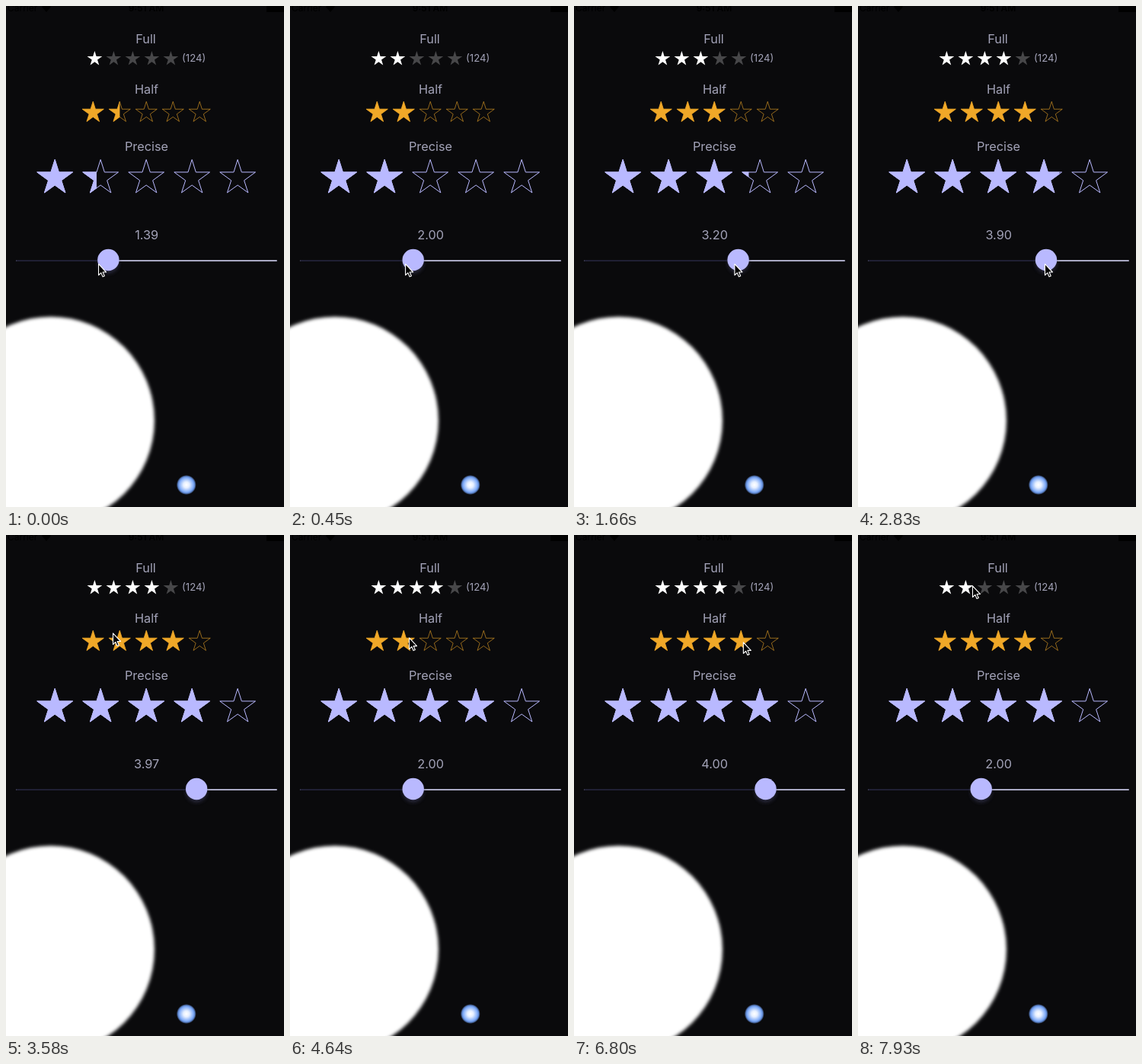
An HTML page for the animation above (7990 ms loop, 365 px wide and 657 px high).

```html
<!DOCTYPE html>
<html lang="en">
<head>
<meta charset="utf-8">
<title>Star ratings</title>
<style>
  html, body { margin: 0; width: 100%; height: 100%; overflow: hidden; background: #0a0a0c; }
  svg { display: block; width: 365px; height: 657px; }
  text { font-family: Inter, "Liberation Sans", sans-serif; font-size: 16.3px; fill: #a3a3b8; }
  .status { font-size: 12px; fill: #000; }
  .count { font-size: 13.2px; }
  .mid { text-anchor: middle; }
</style>
</head>
<body>
<svg viewBox="0 0 365 657">
  <defs>
    <filter id="soft" x="-10%" y="-10%" width="120%" height="120%"><feGaussianBlur stdDeviation="2"/></filter>
    <filter id="glow" x="-50%" y="-50%" width="200%" height="200%"><feGaussianBlur stdDeviation="2.5"/></filter>
    <radialGradient id="planet">
      <stop offset="0" stop-color="#fff"/>
      <stop offset=".3" stop-color="#e6efff"/>
      <stop offset=".72" stop-color="#7fabf8"/>
      <stop offset=".85" stop-color="#5b82c8"/>
      <stop offset="1" stop-color="#5b82c8" stop-opacity="0"/>
    </radialGradient>
  </defs>
  <rect width="365" height="657" fill="#0a0a0c"/>

  <text class="status" x="2" y="7">Carrier</text>
  <path d="M47 1Q53 -4 59 1L53 8Z"/>
  <text class="status mid" x="184" y="7" font-weight="600">9:51 AM</text>
  <rect x="342" width="23" height="8"/>

  <circle cx="59" cy="543.5" r="136" fill="#fff" filter="url(#soft)"/>
  <circle cx="236.8" cy="628" r="13" fill="url(#planet)"/>

  <text class="mid" x="183.5" y="49">Full</text>
  <text class="mid" x="184.5" y="114.5">Half</text>
  <text class="mid" x="184.5" y="190">Precise</text>
  <text class="count" x="231" y="73">(124)</text>
  <g id="stars"></g>

  <text id="readout" class="mid" x="184.7" y="305.5"></text>
  <rect x="13" y="333" width="343" height="2" rx="1" fill="#a9a9c4"/>
  <rect id="track" x="13" y="333" height="2" rx="1" fill="#202034"/>
  <g id="thumb">
    <circle cy="337" r="13.5" fill="#33334c" opacity=".75" filter="url(#glow)"/>
    <circle cy="333" r="14.2" fill="#b9b9ff"/>
  </g>
  <path id="cursor" d="M.5 .9V15.5L3.8 12.4L6 17.5L8.3 16.5L6.1 11.5H10.5Z"
        fill="#000" stroke="#fff" stroke-width="1.1" stroke-linejoin="round"/>
</svg>
<script>
const LOOP = 7990;
const HALF_TAP = 3820, HALF_RELEASE = 7100, FULL_TAP = 7690;
const STAR = "M49.5 0L60.5 35H99L67.5 58L78.5 92L49.5 71L20.5 92L31.5 58L0 35H38.5Z";
const $ = id => document.getElementById(id);
const clamp = v => Math.min(1, Math.max(0, v));

function add(parent, name, attrs) {
  const node = document.createElementNS("http://www.w3.org/2000/svg", name);
  for (const key in attrs) node.setAttribute(key, attrs[key]);
  return parent.appendChild(node);
}

// Builds a row of five stars and returns a function that sets its rating.
function starRow({ id, x, y, size, gap, color, empty = "none", line = 0 }) {
  const inset = line * 1.4, scale = (size - 2 * inset) / 100;
  const clips = Array.from({ length: 5 }, (_, i) => {
    const left = x + i * (size + gap);
    const shape = {
      d: STAR, stroke: line ? color : "none", "stroke-width": line / scale,
      transform: `translate(${left + inset} ${y + inset}) scale(${scale})`
    };
    const clip = add($("stars"), "clipPath", { id: id + i });
    add($("stars"), "path", { ...shape, fill: empty });
    const group = add($("stars"), "g", { "clip-path": `url(#${id}${i})` });
    add(group, "path", { ...shape, fill: color });
    return add(clip, "rect", { x: left, y: y - 1, height: size + 2 });
  });
  return rating => clips.forEach((rect, i) => rect.setAttribute("width", size * clamp(rating - i)));
}

const setFull = starRow({ id: "full", x: 106.5, y: 59, size: 20, gap: 5, color: "#fff", empty: "#474749" });
const setHalf = starRow({ id: "half", x: 99.4, y: 124.5, size: 30, gap: 5, color: "#f0a828", line: .6 });
const setPrecise = starRow({ id: "precise", x: 39.4, y: 200, size: 50, gap: 10, color: "#b9b9ff", line: 1 });

// Each move runs from start to end and leads to the given values.
const drags = [
  [0, 850, 2.54],
  [970, 1660, 3.2],
  [1660, 2420, 3.9],
  [2840, 2950, 3.97]
];
const trips = [
  [3070, 3580, 140, 128],
  [4060, 5110, 169, 139],
  [5230, 6210, 207, 139],
  [6390, 6860, 224, 140],
  [7100, 7660, 138, 67],
  [7810, 7930, 150, 66]
];

const follow = (moves, from, t) => moves.reduce((at, [start, end, ...to]) => {
  const k = clamp((t - start) / (end - start));
  return at.map((v, i) => v + (to[i] - v) * k);
}, from);

const dragValue = t => follow(drags, [1.39], t)[0];
const pointer = t => follow(trips, [52.3 + 49.4 * dragValue(t), 337.5], t);
const touchedHalf = x => Math.ceil(2 * (x - 97.4) / 35) / 2;

function render(t) {
  const drag = dragValue(t);
  const touching = t >= HALF_TAP;
  const half = touching
    ? touchedHalf(pointer(Math.min(t, HALF_RELEASE))[0])
    : Math.round(drag * 2) / 2;
  const full = t >= FULL_TAP ? 2 : Math.round(drag);
  const value = t >= FULL_TAP ? full : touching ? half : drag;
  setFull(full);
  setHalf(half);
  setPrecise(drag);

  const thumbX = 71.9 + 44.9 * value;
  $("readout").textContent = value.toFixed(2);
  $("track").setAttribute("width", thumbX - 13);
  $("thumb").setAttribute("transform", `translate(${thumbX} 0)`);
  $("cursor").setAttribute("transform", `translate(${pointer(t)})`);
}

const start = performance.now();
function tick(now) {
  render(Math.max(0, now - start) % LOOP);
  requestAnimationFrame(tick);
}
render(0);
requestAnimationFrame(tick);
</script>
</body>
</html>
```
